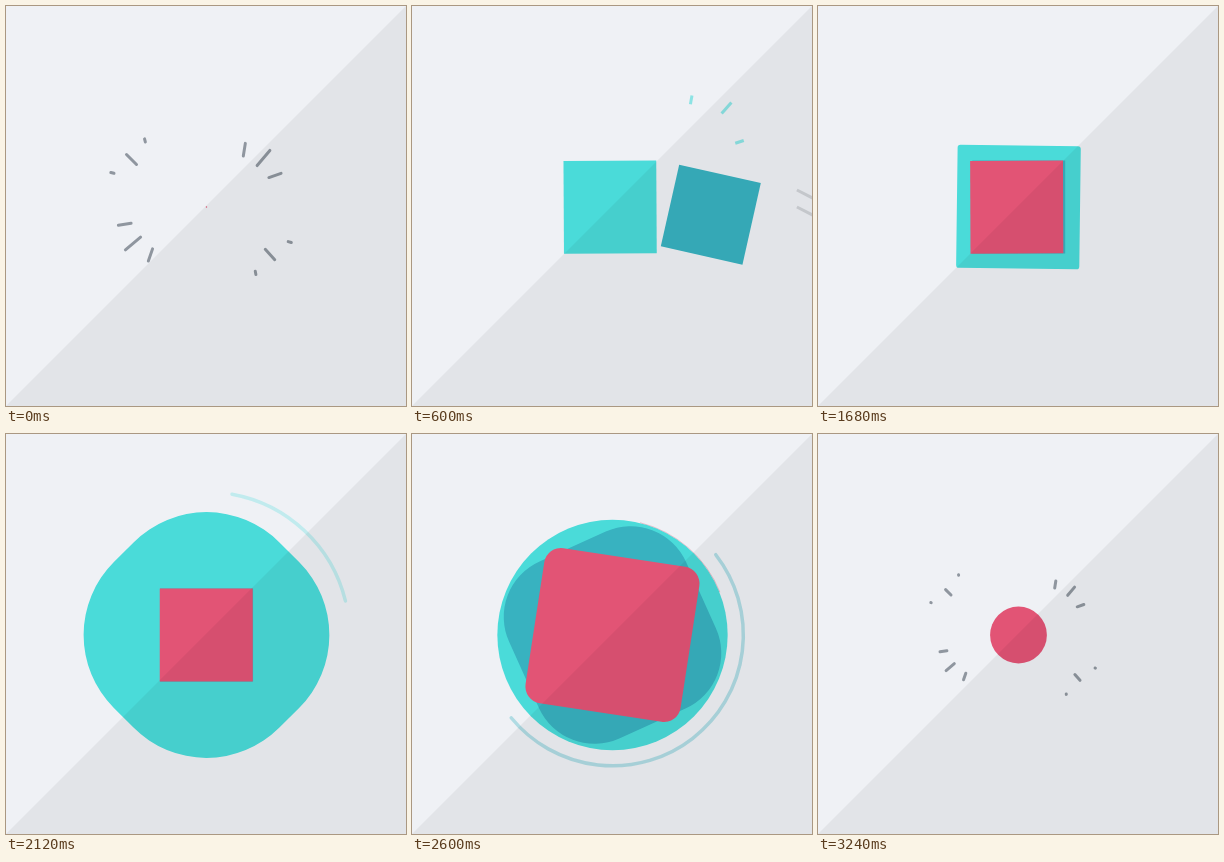
Animation, 400 px wide and 400 px high, one loop 3280 ms. Source, as an HTML page with a canvas:

```html
<!DOCTYPE html>
<html lang="en">
<head>
<meta charset="utf-8">
<title>Squares loop</title>
<style>
  html, body { margin: 0; width: 100%; height: 100%; overflow: hidden; background: #eff1f5; }
  canvas { display: block; }
</style>
</head>
<body>
<canvas id="stage" width="400" height="400"></canvas>
<script>
const ctx = document.getElementById('stage').getContext('2d');
const LOOP = 3280, STEP = 40, CX = 200.5, CY = 201, RAD = Math.PI / 180;
const CYAN = '#4adbd9', TEAL = '#38b2c0', PINK = '#e25475', GREY = '#8f969f';

const { sin, cos, PI } = Math;
const clamp = v => Math.max(0, Math.min(1, v));
const smooth = p => p * p * (3 - 2 * p);
const inOut = p => p < .5 ? 4 * p ** 3 : 1 - 4 * (1 - p) ** 3;

// side: the edge a square enters from (-1 left, 1 right); the rest are start times and sizes
const squares = [
  { color: CYAN, side: -1, enter: 0, morph: 1592, arc: 1812, hide: 2800, grow: 151, trailY: 3, tilt: 36 },
  { color: TEAL, side: 1, enter: 510, morph: 2206, arc: 2424, hide: 3000, grow: 129, trailY: -17, tilt: 27 },
  { color: PINK, side: -1, enter: 1022, morph: 2399, arc: 2588, hide: LOOP, grow: 144, trailY: 1, tilt: 36 }
];

// Fans of three ticks; x and y run from the centre of the stage
const long = { len: 28, ratio: .65, spread: 20, back: -6, delay: 0 };
const short = { len: 20, ratio: .38, spread: 23, back: 4, delay: 35 };
const popFans = [
  { x: 57, y: -49, dir: -50, ...long },
  { x: -73.5, y: 36.5, dir: 140, ...long },
  { x: -75, y: -47.5, dir: -135, ...short },
  { x: 63.5, y: 47.5, dir: 48, ...short }
];

function line(x1, y1, x2, y2, color, cap, alpha) {
  ctx.globalAlpha = alpha;
  ctx.strokeStyle = color;
  ctx.lineWidth = 3;
  ctx.lineCap = cap;
  ctx.beginPath();
  ctx.moveTo(x1, y1);
  ctx.lineTo(x2, y2);
  ctx.stroke();
  ctx.globalAlpha = 1;
}

// Ticks grow and shrink while they slide outwards by `move`
function drawFan(f, age, span, move, color, cap, alpha) {
  const c = cos(f.dir * RAD), s = sin(f.dir * RAD);
  for (let j = -1; j <= 1; j++) {
    const life = (age - (j ? f.delay : 0)) / span;
    if (life <= 0 || life >= 1) continue;
    const half = f.len * (j ? f.ratio : 1) * sin(PI * life) / 2;
    const back = j ? f.back : 0, angle = (f.dir + 31 * j) * RAD;
    const x = CX + f.x + c * back - s * f.spread * j;
    const y = CY + f.y + s * back + c * f.spread * j;
    const from = move - half, to = move + half;
    line(x + cos(angle) * from, y + sin(angle) * from,
         x + cos(angle) * to, y + sin(angle) * to, color, cap, alpha);
  }
}

function drawPop(t) {
  const age = (t + 80) % LOOP;
  for (const f of popFans) drawFan(f, age, 320, (age - 80) * .17, GREY, 'round', 1);
}

// Landing burst on the side opposite the entry
function drawBurst(sq, t) {
  const age = t - sq.enter - 300, out = -sq.side;
  const fan = {
    x: 114 * out, y: -99, dir: -90 + 41 * out,
    len: 46, ratio: .6, spread: 32, back: -17, delay: 0
  };
  drawFan(fan, age, 335, (age - 300) * .12, sq.color, 'butt', .6);
}

// Trails left behind an entering square
function drawTrails(sq, t) {
  const s = t - sq.enter;
  if (s < 40 || s > 190) return;
  const dx = sq.side * 30 * cos(sq.tilt * RAD), dy = 30 * sin(sq.tilt * RAD);
  for (let i = 0; i < 2; i++) {
    const x = CX + sq.side * (185 + (s - 94) * .15), y = CY + sq.trailY + 17 * i;
    line(x, y, x + dx, y + dy, '#cfd2d7', 'butt', clamp((190 - s) / 80));
  }
}

// Widening clockwise arc whose tail catches up with its head
function drawArc(sq, t) {
  const u = (t - sq.arc) / 410;
  if (u < 0 || u >= 1) return;
  const head = -22 + 375 * inOut(clamp(u / .9));
  const tail = -76 + 405 * inOut(clamp((u - .2) / .8));
  ctx.globalAlpha = .43 - .2 * u;
  ctx.strokeStyle = sq.color;
  ctx.lineWidth = 3.5 * clamp(u * 8);
  ctx.lineCap = 'round';
  ctx.beginPath();
  ctx.arc(CX, CY, 114.5 + 38 * u, tail * RAD, head * RAD);
  ctx.stroke();
  ctx.globalAlpha = 1;
}

function drawSquare(sq, t) {
  const s = t - sq.enter;
  if (s <= 0 || t > sq.hide) return;
  const x = 263 / (1 + s / 505) ** 6, p = clamp((t - sq.morph) / 875);
  let size = 93 - .095 * x + sq.grow * sin(2 * p);
  if (sq.color === PINK) size = Math.max(1.4, size * (1 - clamp((t - 2980) / 300) ** 2));
  ctx.save();
  ctx.translate(CX + sq.side * x, CY + .078 * x);
  ctx.rotate((sq.side * x * .129 + 180 * inOut(p)) * RAD);
  ctx.fillStyle = sq.color;
  ctx.beginPath();
  ctx.roundRect(-size / 2, -size / 2, size, size, size / 2 * smooth(clamp(p / .77)));
  ctx.fill();
  ctx.restore();
}

function draw(t) {
  ctx.fillStyle = '#eff1f5';
  ctx.fillRect(0, 0, 400, 400);
  drawPop(t);
  for (const part of [drawTrails, drawBurst, drawArc, drawSquare]) {
    for (const sq of squares) part(sq, t);
  }
  // Diagonal shade over everything
  ctx.fillStyle = 'rgba(0,0,0,.055)';
  ctx.beginPath();
  ctx.moveTo(400, 0);
  ctx.lineTo(400, 400);
  ctx.lineTo(0, 400);
  ctx.fill();
}

const start = performance.now();
function tick() {
  const t = (performance.now() - start) % LOOP;
  // The first step of a loop shows the very end of the collapse
  draw(Math.floor(t / STEP) * STEP || LOOP);
  requestAnimationFrame(tick);
}
tick();
</script>
</body>
</html>
```
